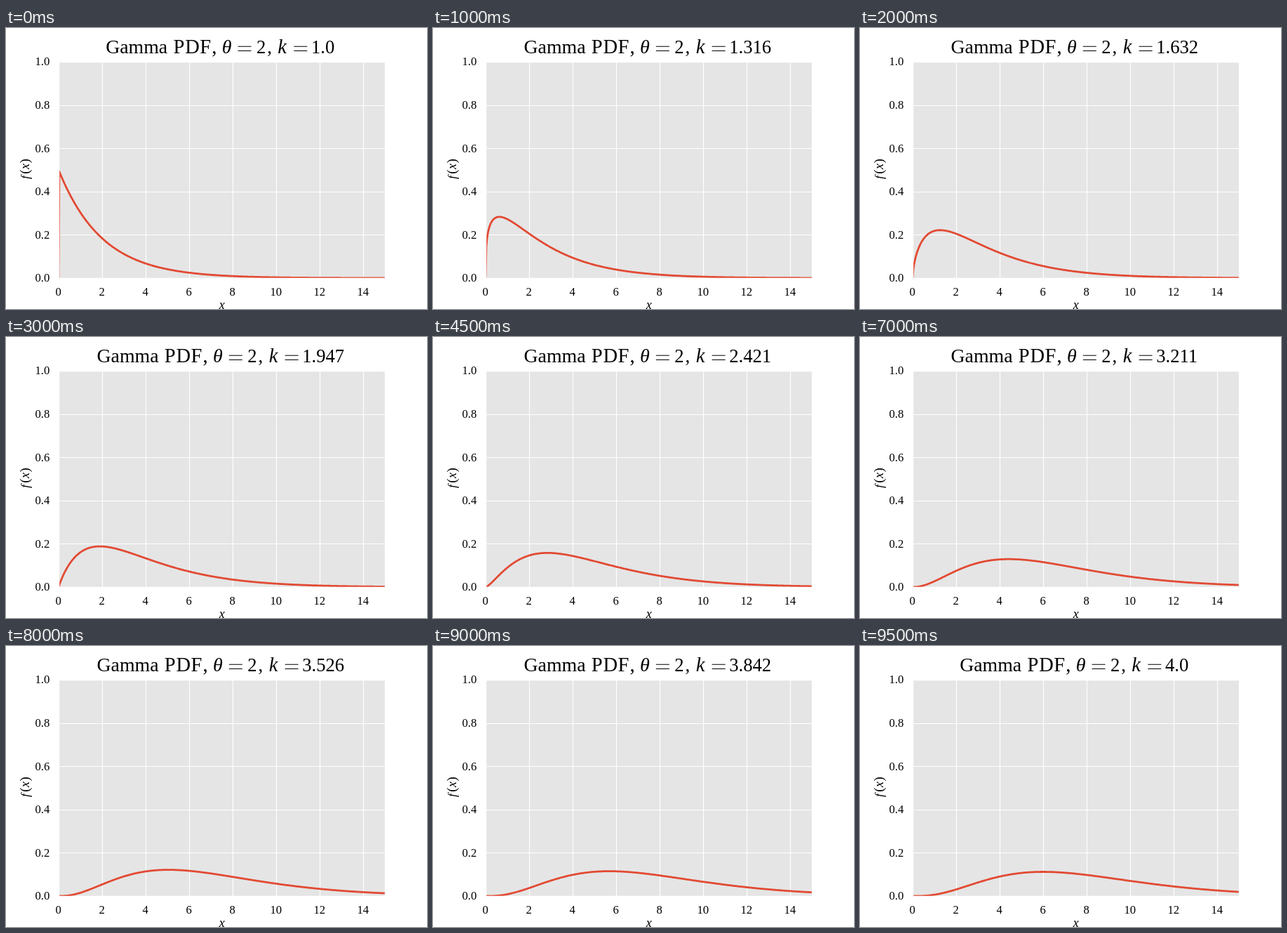
Recreate the animation shown at these times as an HTML page. Size 600 by 400 pixels, loop 10 s.

```html
<!DOCTYPE html>
<html lang="en">
<head>
<meta charset="utf-8">
<title>Gamma PDF</title>
<style>
  html, body { margin: 0; width: 100%; height: 100%; overflow: hidden; background: #fff; }
  svg { display: block; width: 600px; height: 400px; }
  text { font: 16.6px "Liberation Serif", serif; }
  .i { font-style: italic; }
  .num { font-size: 26.6px; }
</style>
</head>
<body>
<svg viewBox="0 0 600 400">
  <clipPath id="box"><path d="M75 48H540V356H75z"/></clipPath>
  <path d="M75 48H540V356H75z" fill="#e5e5e5"/>
  <path id="grid" stroke="#fff" stroke-width="1.11"/>
  <polyline id="curve" clip-path="url(#box)" fill="none" stroke="#e24a33" stroke-width="2.78" stroke-linejoin="round"/>
  <path d="M75.5 48.5H540.5V356.5H75.5z" fill="none" stroke="#fff" stroke-width="1.39"/>
  <g id="ticks"></g>
  <text class="i" x="307.7" y="400" text-anchor="middle" style="font-size:18px">x</text>
  <g transform="translate(33 218) rotate(-90)">
    <text class="i" x="3" style="font-size:17.5px">f</text>
    <text x="10.2" style="font-size:19px">(</text>
    <text class="i" x="17" style="font-size:18px">x</text>
    <text x="25.6" style="font-size:19px">)</text>
  </g>
  <g id="title">
    <text x="129.5" style="font-size:27.8px">Gamma</text>
    <text x="225.7 242.6 263.6 280.6" style="font-size:28.5px">PDF,</text>
    <text class="i" x="302" text-anchor="middle" style="font-size:28px">θ</text>
    <text class="num" x="344.3 359.6">2,</text>
    <text class="i" x="381" text-anchor="middle" style="font-size:28.5px">k</text>
    <text class="num" id="k" x="422.3"></text>
    <path d="M317.8-10H336.8M317.8-3.8H336.8M397.6-10H416.6M397.6-3.8H416.6" stroke="#000" stroke-width="1.1"/>
  </g>
</svg>
<script>
const $ = id => document.getElementById(id);
const STEPS = 20, STEP_MS = 500, SAMPLES = 500, THETA = 2;
const px = x => 75 + 31 * x;
const py = y => 356 - 308 * y;

function drawAxes() {
  let grid = "", labels = "";
  for (let x = 0; x < 15; x += 2) {
    grid += `M${px(x) + 0.5} 48V356`;
    labels += `<text x="${px(x) - 0.3}" y="380.6" text-anchor="middle">${x}</text>`;
  }
  for (let i = 0; i <= 5; i++) {
    const y = py(i / 5);
    grid += `M75 ${Math.round(y) + 0.5}H540`;
    labels += `<text x="62.2" y="${y + 5.4}" text-anchor="end">${(i / 5).toFixed(1)}</text>`;
  }
  $("grid").setAttribute("d", grid);
  $("ticks").innerHTML = labels;
}

// Stirling series, shifted upwards by recurrence
function gamma(k) {
  let div = 1;
  while (k < 9) div *= k++;
  return Math.sqrt(2 * Math.PI / k) * (k / Math.E) ** k * Math.exp(1 / (12 * k)) / div;
}

function drawCurve(k) {
  const scale = 1 / (gamma(k) * THETA ** k);
  const pts = [[px(0), py(0)]];
  for (let i = 1; i < SAMPLES; i++) {
    const x = 15 * i / (SAMPLES - 1);
    pts.push([px(x).toFixed(2), py(scale * x ** (k - 1) * Math.exp(-x / THETA)).toFixed(2)]);
  }
  $("curve").setAttribute("points", pts.join(" "));
}

let shown = -1;
function tick(now) {
  const step = Math.floor(now / STEP_MS) % STEPS;
  if (step !== shown) {
    shown = step;
    const k = 1 + 3 * step / (STEPS - 1);
    const whole = Number.isInteger(k);
    drawCurve(k);
    $("k").textContent = k.toFixed(whole ? 1 : 3);
    $("title").setAttribute("transform", `translate(${whole ? 12.7 : 0} 36.3)`);
  }
}

drawAxes();
tick(0);
let start;
requestAnimationFrame(function loop(now) {
  start ??= now;
  tick(now - start);
  requestAnimationFrame(loop);
});
</script>
</body>
</html>
```
